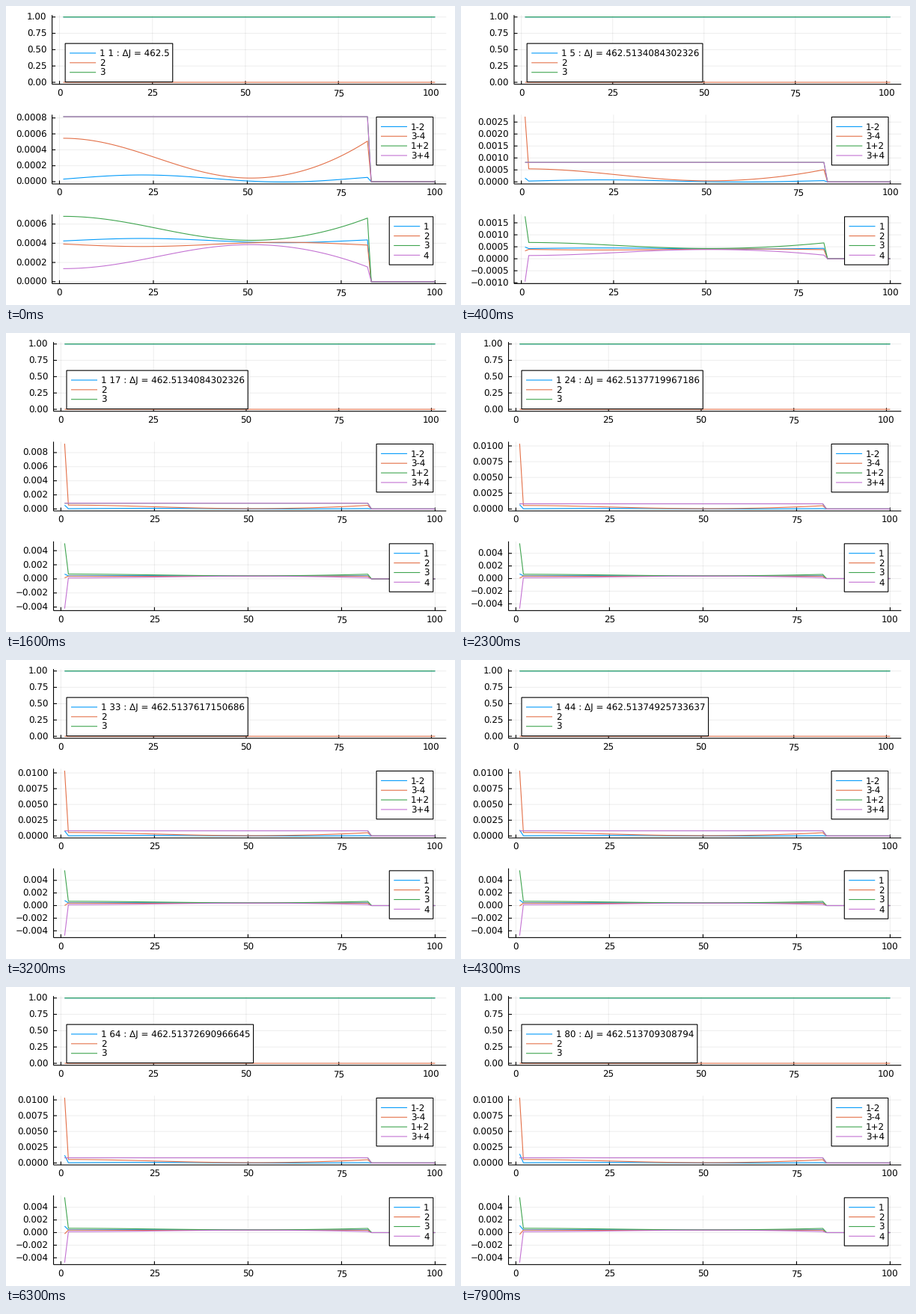
Animation, 600 px wide and 400 px high, one loop 8000 ms. Source, as a matplotlib script:

```python
import math
from itertools import zip_longest

import matplotlib.pyplot as plt
import numpy as np
from matplotlib.animation import FuncAnimation
from matplotlib.collections import LineCollection
from matplotlib.textpath import TextPath

plt.rcParams.update({
    "font.family": "DejaVu Sans",
    "text.hinting": "none",
    "path.snap": False,
})

W, H, DPI = 600, 400, 100
PT = 72 / DPI
EM = 11.9
CAP = 0.729 * EM
RIGHT = 588.3
TOP, PANEL_H, PITCH = 12.1, 92.6, 400 / 3
COLORS = ["#009AFA", "#E36F47", "#3EA44E", "#C371D2"]

fig = plt.figure(figsize=(W / DPI, H / DPI), dpi=DPI, facecolor="white")
ax = fig.add_axes([0, 0, 1, 1])
ax.set(xlim=(0, W), ylim=(H, 0))
ax.axis("off")


def strokes(z, width=1.1, **kw):
    lines = LineCollection([], linewidths=width * PT, zorder=z, **kw)
    return ax.add_collection(lines, autolim=False)


grid = strokes(1, 1, colors="black", alpha=0.07)
frames = strokes(2, colors="black")
curves = strokes(3)
boxes = [ax.add_patch(plt.Rectangle((0, 0), 1, 1, fc="white", ec="black",
                                    lw=1.1 * PT, zorder=4)) for _ in range(3)]
keys = strokes(5)
texts = []

# Control signals: flat sums, smooth differences, switched off after step 82
STEPS = np.arange(1, 101)
ON = STEPS <= 82
SUM = 8.16e-4 * ON
DIFF12 = (4e-5 + 4.4e-5 * np.cos(2 * np.pi * (STEPS - 22) / 75)) * ON
U = STEPS - 51
DIFF34 = np.where(U < 0, 2.95e-4 - 2.5e-4 * np.cos(2 * np.pi * U / 100),
                  4.5e-5 + 4.83e-7 * U ** 2) * ON

LAST_JOINT = 19
COST = {33: 462.5137617150686, 44: 462.51374925733637,
        64: 462.51372690966645, 80: 462.513709308794}


def cost(n):
    if n == 1:
        return 462.5
    if n <= LAST_JOINT:
        return 462.5134084302326
    return sum(v * math.prod((n - m) / (k - m) for m in COST if m != k)
               for k, v in COST.items())


def signals(n):
    """Differences after n updates of the first step."""
    d12, d34 = DIFF12.copy(), DIFF34.copy()
    joint = min(n, LAST_JOINT)
    d12[0] = d12[0] * joint + 1.35e-5 * (n - joint)
    d34[0] *= joint
    return d12, d34


extents = {}


def char_extent(c):
    """Left and right ink edge of a character, in em."""
    if c not in extents:
        box = TextPath((0, 0), c, size=100).get_extents()
        extents[c] = box.x0 / 100, box.x1 / 100
    return extents[c]


ADVANCE = {" ": 0.318, ".": 0.318, ":": 0.337, "Δ": 0.684, "J": 0.295,
           "=": 0.838, "+": 0.838, "\u2212": 0.838, "-": 0.361}


def ink_width(s):
    body = sum(ADVANCE.get(c, 0.636) for c in s[:-1])
    return EM * (body + char_extent(s[-1])[1] - char_extent(s[0])[0])


def limits(series):
    lo, hi = min(map(np.min, series)), max(map(np.max, series))
    pad = 0.03 * (hi - lo)
    return lo - pad, hi + pad


def nice_ticks(lo, hi):
    span, best, found = hi - lo, -1, None
    mag = math.floor(math.log10(span))
    for z in (mag, mag - 1):
        for q, nice in ((1, 1), (5, 0.9), (2.5, 0.5), (2, 0.7)):
            step = q * 10.0 ** z
            ks = range(math.ceil(lo / step), math.floor(hi / step) + 1)
            if not 4 <= len(ks) < 10:
                continue
            score = (0.25 * (1 - abs(len(ks) - 5) / 5) + 0.25 * nice
                     + 0.5 * span / (step * (len(ks) - 1)))
            if score > best + 1e-9:
                best, found = score, (step, ks)
    step, ks = found
    places = next(d for d in range(9) if abs(round(step, d) - step) < 1e-9)
    return [(k * step, f"{k * step:.{places}f}".replace("-", "\u2212")) for k in ks]


def panel(row, left, x_last, series, y_lim, y_ticks):
    """Grid segments, axis segments, curves and labels of one plot."""
    top = TOP + row * PITCH
    bottom = top + PANEL_H
    pad = 0.03 * (x_last - 1)
    x_lo, x_hi = 1 - pad, x_last + pad
    lo, hi = y_lim

    def px(v):
        return left + (v - x_lo) / (x_hi - x_lo) * (RIGHT - left)

    def py(v):
        return bottom - (v - lo) / (hi - lo) * PANEL_H

    rules, labels = [], []
    axes = [[(left, bottom), (RIGHT, bottom)], [(left, top), (left, bottom)]]
    for v in range(0, 101, 25):
        x = px(v)
        rules.append([(x, top), (x, bottom)])
        axes.append([(x, bottom), (x, bottom - 4.5)])
        labels.append((x, bottom + 16, str(v), "center"))
    for v, label in y_ticks:
        y = py(v)
        rules.append([(left, y), (RIGHT, y)])
        axes.append([(left, y), (left + 4.5, y)])
        labels.append((left - 7, y + CAP / 2, label, "right"))
    xs = px(np.arange(1, x_last + 1))
    return rules, axes, [np.column_stack([xs, py(s)]) for s in series], labels


def legend(row, left, names, at_left=False):
    """Place the box; give the key segments and labels."""
    top = TOP + row * PITCH
    row_h = 12.87
    w = 52.2 + max(map(ink_width, names))
    h = row_h * (len(names) + 1)
    inset = (RIGHT - left) / 30
    x = left + inset if at_left else RIGHT - inset - w
    y = top + PANEL_H * 29 / 30 - h if at_left else top + PANEL_H / 30
    boxes[row].set_bounds(x, y, w, h)
    ys = [y + row_h * (i + 1) for i in range(len(names))]
    return ([[(x + 6, v), (x + 41, v)] for v in ys],
            [(x + 45.7, v + CAP / 2, s, "left") for v, s in zip(ys, names)])


def show_labels(labels):
    while len(texts) < len(labels):
        texts.append(ax.text(0, 0, "", va="baseline", fontsize=EM * PT,
                             color="black", zorder=6))
    for item, label in zip_longest(texts, labels):
        item.set_visible(label is not None)
        if label:
            x, y, s, ha = label
            item.set(position=(x, y), text=s, ha=ha)


def draw(frame):
    n = frame + 1
    d12, d34 = signals(n)
    states = [np.ones(101), np.zeros(101), np.ones(101)]
    mixes = [d12, d34, SUM, SUM]
    parts = [(SUM + d12) / 2, (SUM - d12) / 2, (SUM + d34) / 2, (SUM - d34) / 2]

    groups = [(101, states), (100, mixes), (100, parts)]
    lims = [limits(g) for _, g in groups]
    ticks = [[(k / 4, f"{k / 4:.2f}") for k in range(5)]]
    ticks += [nice_ticks(*lim) for lim in lims[1:]]
    left = 21.4 + max(ink_width(s) for t in ticks for _, s in t)
    names = [[f"1 {n} : ΔJ = {float(cost(n))!r}", "2", "3"],
             ["1-2", "3-4", "1+2", "3+4"], ["1", "2", "3", "4"]]

    rules, axes, plots, marks, labels = [], [], [], [], []
    for row, (x_last, series) in enumerate(groups):
        r, a, p, lab = panel(row, left, x_last, series, lims[row], ticks[row])
        m, key_lab = legend(row, left, names[row], at_left=row == 0)
        rules += r
        axes += a
        plots += p
        marks += m
        labels += lab + key_lab
    grid.set_segments(rules)
    frames.set_segments(axes)
    curves.set_segments(plots)
    keys.set_segments(marks)
    show_labels(labels)
    return []


palette = COLORS[:3] + COLORS + COLORS
curves.set_color(palette)
keys.set_color(palette)

anim = FuncAnimation(fig, draw, frames=80, interval=100, init_func=lambda: [],
                     repeat=True, repeat_delay=0, cache_frame_data=False)
plt.show()
```
